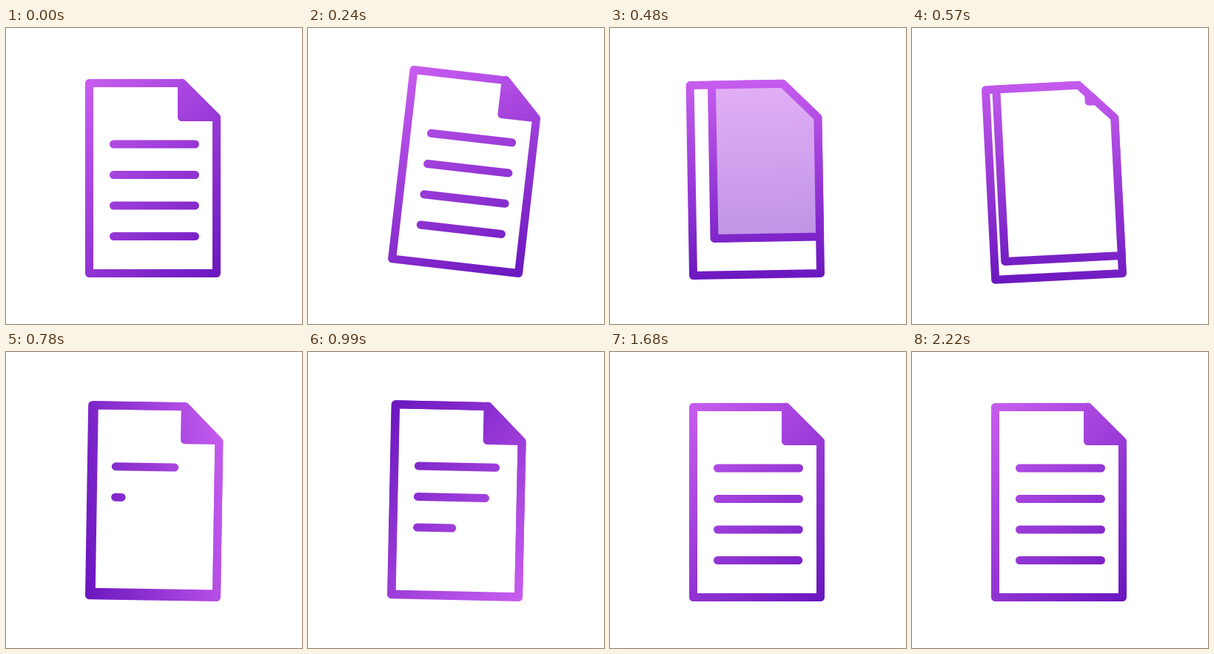
Recreate the animation shown at these times as an HTML page. Size 400 px wide and 400 px high, loop 4.4 s.

```html
<!DOCTYPE html>
<html lang="en">
<head>
<meta charset="utf-8">
<title>Page turn</title>
<style>
  html, body { margin: 0; width: 100%; height: 100%; overflow: hidden; background: #fff; }
  svg { display: block; width: 100%; height: 100%; }
</style>
</head>
<body>
<svg viewBox="0 0 400 400">
  <defs>
    <linearGradient id="ink" gradientUnits="userSpaceOnUse">
      <stop offset="0" stop-color="#c65cee"/>
      <stop offset="1" stop-color="#6c18c0"/>
    </linearGradient>
  </defs>
  <g id="doc" fill="none" stroke="url(#ink)" stroke-width="11" stroke-linecap="round" stroke-linejoin="round">
    <path d="M112.5 74.5H238L284.5 121V331.5H112.5Z"/>
    <path id="lines"/>
    <path id="sheet" stroke="none" fill="#fff"/>
    <path id="turn" fill="url(#ink)"/>
    <path id="fold" fill="url(#ink)"/>
  </g>
</svg>
<script>
const LOOP = 4400;
const LEFT = 112.5, TOP = 74.5, RIGHT = 284.5, BOTTOM = 331.5;
const CX = (LEFT + RIGHT) / 2, CY = (TOP + BOTTOM) / 2;
const LINE_X = 145.5, LINE_W = 110;

// Corner of the fold: on the cut edge, at rest, and fully turned
const EDGE = [254.8, 91.3], REST = [237.5, 120.5], TURNED = [LEFT, BOTTOM];
const CUT = 163.5; // x - y along the cut edge

const SWAY = [[0, 0], [270, 6.75], [570, -2.95], [870, 1.9], [1170, 0]];
const LIGHT = [[0, -135], [240, -122], [390, -103], [570, -82], [780, -10], [1230, 95], [1620, 225]];

const $ = id => document.getElementById(id);
const [doc, ink, lines, sheet, turn, fold] = ["doc", "ink", "lines", "sheet", "turn", "fold"].map($);

const clamp = v => Math.min(1, Math.max(0, v));
const mix = (a, b, p) => a + (b - a) * p;
const between = (a, b, p) => a.map((v, i) => mix(v, b[i], p));
const linear = p => p;
const sine = p => (1 - Math.cos(Math.PI * p)) / 2;
const expoOut = p => p >= 1 ? 1 : 1 - 2 ** (-10 * p);
const grow = (t, start, length) => expoOut(clamp((t - start) / length));

function track(keys, t, ease) {
  const i = keys.findIndex(k => k[0] > t);
  if (i < 0) return keys[keys.length - 1][1];
  const [t0, a] = keys[i - 1], [t1, b] = keys[i];
  return mix(a, b, ease((t - t0) / (t1 - t0)));
}

const triangle = ([x, y]) => `M${x} ${x - CUT}V${y}H${y + CUT}Z`;
const page = ([x, y]) => `M${x} ${TOP}H238L${RIGHT} 121V${y}H${x}Z`;

function setLight(degrees) {
  const a = degrees * Math.PI / 180, c = Math.cos(a), s = Math.sin(a);
  const reach = Math.abs(c) * (RIGHT - CX) + Math.abs(s) * (BOTTOM - CY);
  const ends = { x1: CX + c * reach, y1: CY + s * reach, x2: CX - c * reach, y2: CY - s * reach };
  for (const k in ends) ink.setAttribute(k, ends[k]);
}

function linePath(t) {
  let d = "";
  for (let i = 0; i < 4; i++) {
    const p = t < 600 ? 1 : grow(t, 621 + 150 * i, 866);
    if (p > 0) d += `M${LINE_X} ${157 + 41.5 * i}h${LINE_W * p}`;
  }
  return d;
}

function draw(t) {
  doc.setAttribute("transform", `rotate(${track(SWAY, t, sine)} ${RIGHT} ${BOTTOM})`);
  setLight(track(LIGHT, t, linear));
  lines.setAttribute("d", linePath(t));

  // The old fold sweeps over the page, then turns into a blank sheet
  const turning = t > 300 && t < 1166;
  const swept = turning ? page(between(REST, TURNED, grow(t, 300, 866))) : "";
  sheet.setAttribute("d", t < 600 ? swept : "");
  turn.setAttribute("d", swept);
  turn.setAttribute("fill-opacity", 1 - clamp((t - 420) / 120));

  let corner = "";
  if (t <= 300) corner = triangle(REST);
  else if (t > 555) corner = triangle(between(EDGE, REST, grow(t, 555, 480)));
  fold.setAttribute("d", corner);
}

const start = performance.now();
function tick() {
  draw((performance.now() - start) % LOOP);
  requestAnimationFrame(tick);
}
tick();
</script>
</body>
</html>
```
